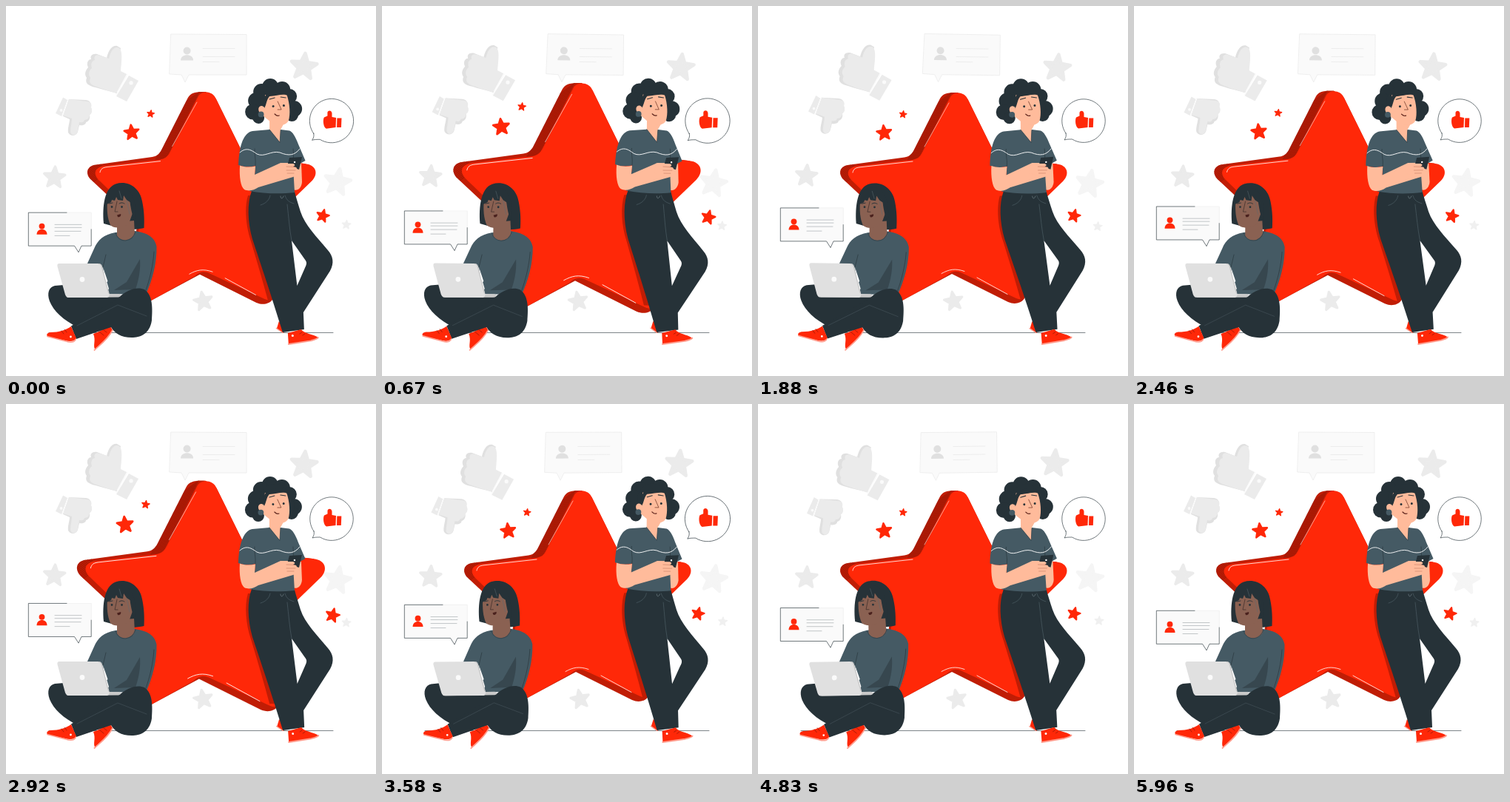
Animation of 500 by 500 pixels, one loop 6 s. Source, as an HTML page with a canvas:

```html
<!DOCTYPE html>
<html lang="en">
<head>
<meta charset="utf-8">
<title>Reviews</title>
<style>
html, body { margin: 0; width: 100%; height: 100%; overflow: hidden; background: #fff; }
canvas { display: block; width: 500px; height: 500px; }
</style>
</head>
<body>
<canvas id="stage" width="500" height="500"></canvas>
<script>
const ctx = document.getElementById('stage').getContext('2d');
const LOOP = 6000, LEAD = 40;
const RED = '#ff2808', SIDE = '#c01d05', INK = '#263238', SLATE = '#455a64', DEEP = '#37474f';
const SKIN = '#ffbb9b', BROWN = '#8a6152', PALE = '#ebebeb', MIST = '#e0e0e0', ROSE = '#ff9b8c';

function fill(d, color, rule) {
  ctx.fillStyle = color;
  ctx.fill(new Path2D(d), rule || 'nonzero');
}
function line(d, color, width) {
  ctx.strokeStyle = color;
  ctx.lineWidth = width || 0.7;
  ctx.stroke(new Path2D(d));
}
function dot(x, y, r, color) {
  ctx.fillStyle = color;
  ctx.beginPath();
  ctx.arc(x, y, r, 0, Math.PI * 2);
  ctx.fill();
}
function smallStar(x, y, r, tilt, color) {
  const soft = r * 0.11, out = r - soft;
  ctx.beginPath();
  for (let i = 0; i < 10; i++) {
    const a = (i * 36 - 90 + tilt) * Math.PI / 180, q = i % 2 ? out * 0.44 : out;
    ctx.lineTo(x + q * Math.cos(a), y + q * Math.sin(a));
  }
  ctx.closePath();
  ctx.fillStyle = ctx.strokeStyle = color;
  ctx.lineWidth = soft * 2;
  ctx.fill();
  ctx.stroke();
}

// Piecewise linear keyframes: [position, value] pairs
function keys(p, list) {
  for (let i = 1; i < list.length; i++) {
    const [a, u] = list[i - 1], [b, v] = list[i];
    if (p <= b) return u + (v - u) * (p - a) / (b - a);
  }
  return list[list.length - 1][1];
}
const phase = (t, span) => (t % span) / span;
const wind = (t, span) => keys(phase(t, span), [[0, 0], [.25, 1], [.75, -1], [1, 0]]);
const beat = (t, span) => keys(phase(t, span),
  [[0, 1], [.1, 1.1], [.3, 1], [.4, 1], [.5, 1.1], [.6, 1], [1, 1]]);

function turn(x, y, deg) {
  ctx.translate(x, y);
  ctx.rotate(deg * Math.PI / 180);
  ctx.translate(-x, -y);
}
function zoom(x, y, s) {
  ctx.translate(x, y);
  ctx.scale(s, s);
  ctx.translate(-x, -y);
}
function group(move, draw) {
  ctx.save();
  move();
  draw();
  ctx.restore();
}

function backdrop() {
  // Card
  const card = 'M223 38 L325 38.5 L325 93 L247 93 L242 103 L237 93 L221 92Z';
  fill(card, '#fafafa');
  line(card, PALE, 0.8);
  dot(244.5, 60.5, 5, MIST);
  fill('M236 73.5 C236 64 253 64 253 73.5Z', MIST);
  line('M266 57.5H309 M266 68.5H309 M266 75.5H288', PALE, 0.9);

  // Raised thumb
  fill('M136 70 C139 58 144 53 150 54 L155 57 L146 88 L150 118 C140 115 130 113 121 110 C111 108 106 104 109 97 C105 92 108 86 111 83 C108 77 111 72 115 72 C113 67 117 64 123 65Z', MIST);
  fill('M139 71 C142 59 147 54 153 57 C158 61 156 75 155 88 L163 92 L149 118 C142 115 132 113 125 110 C115 107 111 104 114 97 C110 92 113 86 116 84 C114 78 116 74 120 73 C118 68 122 65 127 67Z', PALE);
  fill('M166 94 L179 101 L163 129 L149 122Z', PALE);
  line('M164 92.5 L149 120', '#fafafa', 1.2);
  dot(169, 104, 2.6, '#fafafa');

  // Lowered thumb
  fill('M85 126 L108 127 C114 128 116 132 114 136 C117 140 116 145 113 147 C114 152 112 156 108 157 C108 160 104 162 99 161 L97 170 C95 176 87 177 84 171 C83 165 86 158 86 153 L77 149Z', MIST);
  fill('M85 126 L110 129 C116 130 116 134 115 137 C117 141 116 146 113 147 C113 151 110 154 106 154 C105 157 103 158 99 157 L97 169 C95 176 88 176 87 170 C87 164 89 158 89 152 L77 148Z', PALE);
  fill('M77 123.5 L83 127 L75 149 L67 145Z', PALE);
  line('M84 126 L76 149', '#fafafa', 1);
  dot(74.5, 141, 1.9, '#fafafa');

  smallStar(402.5, 82, 20.5, 6, PALE);
  smallStar(65.5, 232, 16.5, 4, PALE);
  smallStar(448, 238, 20.5, 10, '#f5f5f5');
  smallStar(460, 295.5, 6.8, 5, '#f0f0f0');
  smallStar(266.5, 399, 14.5, -10, PALE);
}

const STAR = 'M260 123 C264 115.5 279 115 283.5 126 L322 204 L404 213.5 C418 215 422 227 412 237 L352 295 L361 383 C364 394 358 399 349 395 L276 361 C268 357 262 358 255 364.5 L194 398.5 L165 402 L182 289 L128 237 C118 228 120 218 134 216.5 L208 208 C215 207 219 204 222 198Z';
const RIM = 'M246 125 C250 118 256 116.5 270 117 L283.5 126 L322 204 L404 213.5 L352 295 L361 383 C365 397 352 406 338 400 L262 362 L194 398.5 L165 402 L178 293 L116 235 C108 227 110 217 121 215 L198 204.5 C204 203.5 207 201 210 196Z';
const rimPath = new Path2D(RIM);

function bigStar() {
  fill(RIM, SIDE);
  group(() => ctx.clip(rimPath), () => {
    for (let y = 125; y < 238; y += 2.4) {
      const x = y < 212 ? 250 - (y - 120) * 0.5 : 116;
      line(`M${x - 8} ${y + 8} l22 -16`, '#8f1606', 0.7);
    }
  });
  fill(STAR, RED);
  line('M128 225 C129 220 132 218.5 138 217.8 L209 210', '#fff', 0.8);
  line('M225 190 L258 131', '#ffd4cc', 0.7);
  line('M248 361.5 C258 356 266 354 279 358.5 M296 367 L337 389.5', '#fff', 0.8);
  smallStar(170.5, 171.5, 11.5, -6, RED);
  smallStar(196, 146.5, 5.6, 8, RED);
  smallStar(427, 283.5, 9.7, 14, RED);
}

function profileCard() {
  const card = 'M30 279 H115.5 V324 H102 L98 333 L92.5 324 H30Z';
  fill(card, '#fafafa');
  line('M82 279.3 H115.3 V302', '#ededed', 0.6);
  line('M82 279.3 H30.3 V324.3 H92.5 L98 333 L102 324.3 H115.2 V302', INK, 0.65);
  dot(48.5, 297.7, 3.9, RED);
  fill('M41.5 309 C41.5 299.5 55.5 299.5 55.5 309Z', RED);
  line('M66 295.5H102 M66 299.5H102 M66 304.5H101 M66 310.5H86', '#a9afb2', 0.7);
}

function sitter() {
  // Hair, neck and jumper
  fill('M132 294 C130 270 133 246 148 240.5 C165 235 181 246 184 264 C187 278 187 290 186.5 300 C175 303 160 302 150 299Z', INK);
  fill('M148 306 C132 309 124 316 119 328 L109.5 349 L130 352 L139 382 L135 389 L189 390 C198 370 204 347 203.5 325 C201 311 188 306 174 304Z', SLATE);
  fill('M150 292 L173 290 L174 309 C168 319 155 318 150 311Z', BROWN);
  line('M148 307 C153 321 170 320 175 305', DEEP, 1);
  fill('M131 353 L137.5 372 L135 374Z', '#fff');
  line('M131 353 L135 336 M200 332 C199 350 194 370 189 384', INK, 0.6);
  fill('M181 342 L163 373 L146 384 L175 383 C180 369 182 355 181 342Z', DEEP);

  // Face
  fill('M137 262 C136 276 137 287 141 296 C146 301 158 301 166 294 L171 280 L166 256 L147 253Z', BROWN);
  fill('M136 268 C134 252 144 244 155 245 C170 246 177 262 175 291 C171 285 169 276 167.5 265 L163 262 L159 256 L158 263 L151 262 L149 258 L147 263 L143 262 L142 265Z', INK);
  line('M163 263 L167 281 M156 260 L153 250', '#5c6b72', 0.5);
  line('M150 264 L147 278 L151 278', '#3a2a27', 0.7);
  line('M139 267 L144 266 M153 267 C156 265 158 266 160 267', INK, 0.9);
  dot(143, 271.5, 1.4, INK);
  dot(156.5, 271.5, 1.4, INK);
  fill('M150 282.5 L155 281 C156 283 154 286 151 285Z', '#4a211d');

  // Legs
  fill('M66 378 L78 377 L84 393 L150 393 L170 388 L160 405 L97 434 C78 425 64 412 59 399 C55 388 58 380 66 378Z', INK);
  fill('M118 443 C128 440 135 434 140 431 L144 438 C138 450 128 457 120.5 464 C117 459 122 452 118 443Z', RED);
  line('M119.5 465 C128 457 138 450 144 438', ROSE, 1.8);
  fill('M88 432.5 L150 396 C164 382 178 379 187 383 C199 391 198 410 197 425 C194 444 181 448 170 448 C155 448 147 442 142 434 L95 450Z', INK);
  line('M96 432 L151 404 L190 419', '#4c5b62', 0.5);

  // Left shoe
  fill('M88 433 L95 449 C93 453 87 454 80 452 L57 447 C54 445 55 442 60 441 C72 441 81 438 88 433Z', RED);
  line('M56 446.5 L81 453 C87 455 92 454 94 451', ROSE, 1.6);
  line('M75 439 L78 443 M79 437 L82 441', '#8e1607', 0.7);
  dot(87.5, 447, 1.4, '#fff');
  line('M126 440 L132 445 M131 437 L136 441', '#8e1607', 0.7);

  // Laptop
  fill('M84 390 L152 389 C156 390 156 392.5 152 393.5 L85 394Z', '#c9c9c9');
  fill('M72 348 H125 C128 348 129 349 130 352 L139.5 388 C140 392 139 394 136 394 H84 C82 394 81 392 80 390 L69.5 352 C69 349 70 348 72 348Z', MIST);
  line('M125 348.4 C128 348.5 128.7 350 129.5 353 L138.5 388', '#bdbdbd', 0.8);
  dot(103, 369.5, 3.4, '#fafafa');
}

const SHADE = 'M327 256 C322 272 324 298 331 318 C340 348 348 375 356 405 L376 405 L340 256Z';

function stander() {
  // Back shoe and trousers
  fill('M369 426 L377 436 L375 442 L366 436Z', RED);
  line('M365.5 435.5 L374 441.5', ROSE, 1.4);
  fill('M332 250 C326 266 326 290 333 315 C343 345 360 395 374 441 L403 437 L402 414 L438 358 C444 347 442 338 435 330 C420 312 404 296 398 278 C395 268 392 259 390 251Z M386 317 L405 344 C407 347 406 350 404 354 L393.5 378Z', INK, 'evenodd');
  line('M344 269 C351 267 356 262 357 256 M377 256 C379 263 383 265 389 267 M380 268 C382 285 383 301 386 317', '#53646c', 0.6);
  line('M371 257 C371 261 374 261 375 257', '#718087', 0.7);

  // Front shoe
  fill('M381 442 L399 437 C403 443 415 443 422 448 C421 450 417 451 412 452 L382 457Z', RED);
  line('M382 457 L412 452.3 C417 451 421 450 422 448', ROSE, 1.9);
  line('M397 443 L400 441 M401 445 L404 443', '#8e1607', 0.7);
  dot(387.5, 445.5, 1.5, '#fff');

  // Curls
  const curls = [357, 109, 11, 345, 116, 11, 338, 128, 11, 333.5, 143, 10.5, 341, 151, 8,
    373, 113, 11, 383, 122, 10, 389, 139, 11, 386, 147, 9, 363, 128, 20, 374, 138, 16];
  for (let i = 0; i < curls.length; i += 3) dot(curls[i], curls[i + 1], curls[i + 2], INK);

  // Right forearm, jumper
  fill('M386 214 L399 213 L400 238 C399 248 391 252 386 246Z', SKIN);
  fill('M333 169 C322 171 315 186 314 215 C322 218 330 218 337 216 L336 228 L329 250 C350 254 372 254 390 252 L388 218 L404.5 209 L395 187 C391 176 387 170 383 168.5 L371 167 L356 167Z', SLATE);
  fill('M356 151 L356 167 L370 184 L371 167 L377 156Z', SKIN);
  line('M356 167 L370 184.5 L371 168', DEEP, 0.8);
  line('M337 216 C338 207 335 199 336 193 M388 193 C389 207 388 213 388 218', INK, 0.6);
  line('M316 198 C325 190 332 195 339 200 C349 205 358 195 370 198 C382 203 390 202 397 193', '#fff', 0.9);

  // Head
  fill('M350 120 C359 123 371 118 379 119 C384 133 384 147 382 154 C379 163 365 162 358 157 L348 149Z', SKIN);
  fill('M349 137 C344 132 339 137 342 143 C344 147 347 148 350 147Z', SKIN);
  fill('M349 138 C346 126 349 118 360 115 C372 112 381 114 381 121 C374 118 367 121 356 122 C352 126 352 133 349 138Z', INK);
  dot(344.5, 146.5, 3.9, SLATE);
  line('M356 126 L363 124 M371 123 L378 124', INK, 1.1);
  line('M367 129 L372 140 L367 140', '#7a4130', 0.8);
  dot(361, 135.5, 1.5, INK);
  dot(375.3, 134.5, 1.5, INK);
  line('M363 146 C365 148 367 149 369 148', '#5a211a', 1.2);

  // Left arm, hands and phone
  fill('M316 215.5 C315 231 317 244 322 248 C328 251 335 249 341 245 L388 231 C394 229 398 224 397 219 L390 212 L371 212 L336 228 L337 216.5 C330 218 322 218 316 215.5Z', SKIN);
  fill('M383 205 L400 204 L396 221 L380 216Z', INK);
  fill('M369 213 L388 213 C391 214 391 216 388 217 L392 218 C394 220 393 222 390 222 L391 225 C390 228 385 229 379 229 L367 226Z', SKIN);
  line('M379 217 L390 217.5 M379 222 L391 222 M380 226 L389 226', '#b76f57', 0.5);
  dot(390, 211, 1.2, '#fff');
}

function likeBubble() {
  const shape = 'M416 172 A29.3 29.3 0 1 1 424.5 180 C420 180 417 180 414 181 C416 178 417 175 416 172Z';
  fill(shape, '#fff');
  line(shape, INK, 0.65);
  fill('M430 150.5 L434.5 148.5 L434.5 144 C435.5 140.5 440 141 440.5 145 L440.5 150 L446 151 L445.5 164 L433 165.5 C429 164 428 154 430 150.5Z', RED);
  fill('M447.3 151.5 L453.3 151.5 L452.8 164 L447 164Z', RED);
}

function draw(t) {
  ctx.setTransform(1, 0, 0, 1, 0, 0);
  ctx.fillStyle = '#fff';
  ctx.fillRect(0, 0, 500, 500);
  ctx.lineJoin = ctx.lineCap = 'round';

  const scale = beat(t, LOOP), sway = wind(t, LOOP), lean = wind(t, LOOP / 2);
  const rise = -10 * (1 - Math.abs(1 - 2 * phase(t, LOOP)));

  group(() => turn(267, 225, sway), backdrop);
  line('M58 441.5 H442', INK, 0.6);
  group(() => zoom(273.5, 260, scale), bigStar);

  // The standing figure's shadow falls only on the big star
  group(() => {
    zoom(273.5, 260, scale);
    ctx.clip(rimPath);
    ctx.setTransform(1, 0, 0, 1, 0, 0);
    turn(378, 278, lean);
  }, () => fill(SHADE, SIDE));

  group(() => ctx.translate(0, rise), profileCard);
  group(() => turn(129, 352, sway), sitter);
  group(() => turn(378, 278, lean), stander);
  group(() => zoom(440.5, 155.5, beat(t, LOOP / 2)), likeBubble);
}

const start = performance.now();
function tick() {
  draw((performance.now() - start + LEAD) % LOOP);
  requestAnimationFrame(tick);
}
tick();
</script>
</body>
</html>
```
